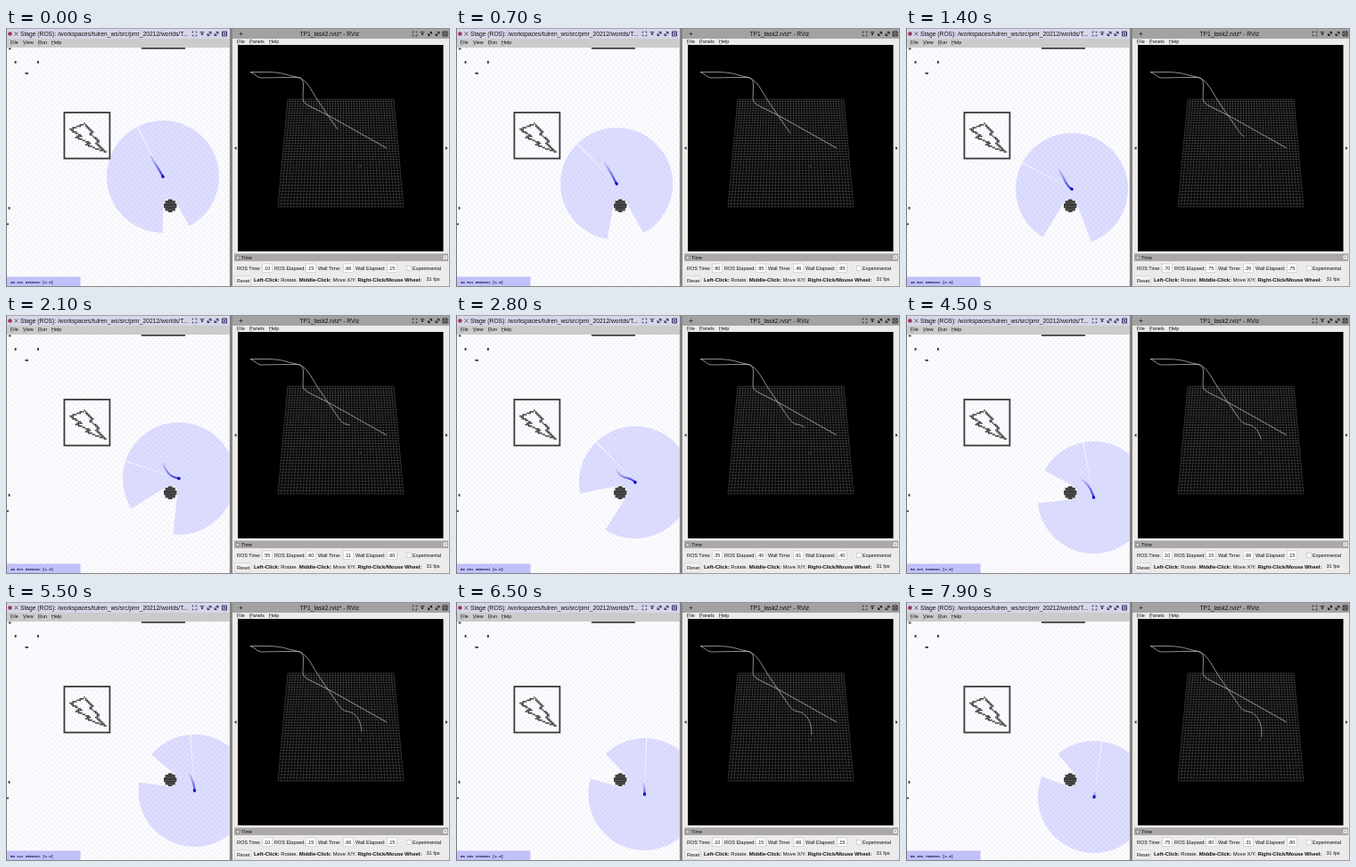
An HTML page for the animation above (8000 ms loop, 498 by 291 pixels).

```html
<!DOCTYPE html>
<html lang="en">
<head>
<meta charset="utf-8">
<title>Robot simulation</title>
<style>
html, body { margin: 0; width: 100%; height: 100%; overflow: hidden; background: #d6d6d6; }
svg { display: block; width: 498px; height: 291px; }
text { font-family: "Liberation Sans", Arial, sans-serif; font-size: 5.5px; fill: #111; white-space: pre; }
.title { font-size: 6.7px; }
.mono { font: bold 4px "Liberation Mono", monospace; fill: #101040; }
.hint { font-size: 5.85px; }
.hint tspan { font-weight: bold; }
</style>
</head>
<body>
<svg viewBox="0 0 498 291">
  <defs>
    <pattern id="weave" width="6" height="6" patternUnits="userSpaceOnUse">
      <path d="M0 0L6 6M6 0L0 6" stroke="#ececf7" stroke-width=".6"/>
    </pattern>
    <clipPath id="world"><rect x="1" y="22" width="249.5" height="268"/></clipPath>
    <clipPath id="view"><rect x="260" y="19" width="230.5" height="232"/></clipPath>
  </defs>

  <g id="stage">
    <rect width="251" height="12" fill="#d6d6e8"/>
    <rect y="12" width="251" height="10" fill="#cbcbcb"/>
    <rect x="1" y="22" width="249.5" height="268" fill="#fcfcff"/>
    <rect x="1" y="22" width="249.5" height="268" fill="url(#weave)"/>
    <g clip-path="url(#world)">
      <path id="scan" fill="#0000ff" fill-opacity=".122"/>
      <g id="trail" stroke="#1c1cd8" stroke-width="2.2"></g>
      <rect id="robot" x="-1.6" y="-1.5" width="3.2" height="3" fill="#0c0cc0"/>
      <g id="map" fill="#3a3a3a"></g>
      <rect x="65.4" y="95" width="51" height="51.6" fill="none" stroke="#3a3a3a" stroke-width="1.8"/>
      <rect x="1" y="279.5" width="82.5" height="10.5" fill="#c0c0fa"/>
      <text id="clock" class="mono" x="5" y="286.6"></text>
    </g>
    <path d="M.5 0V290.5H251" fill="none" stroke="#777" stroke-width="1"/>
  </g>

  <g id="rviz">
    <rect x="251" width="3" height="291" fill="#858585"/>
    <rect x="254" width="244" height="291" fill="#ecebea"/>
    <rect x="254" width="244" height="12" fill="#a2a2a2"/>
    <rect x="260" y="19" width="230.500" height="232"/>
    <path d="M258.5 133l-2.5 2 2.5 2zM493 133l2.5 2-2.5 2z" fill="#333"/>
    <g clip-path="url(#view)" fill="none">
      <path id="grid" stroke="#777" stroke-width=".36"/>
      <path d="M427 135L363 99 341 88Q333 84 333 80L333.500 63Q333 56 327 55.500L312 55.500 286 56Q281 55 279 52L274 49.500 295 49.500Q309 50 317 53L330 56Q337 60 341 67L350 82 372 114" stroke="#c8c8c8" stroke-width=".7"/>
      <path id="track" stroke="#c8c8c8" stroke-width=".7"/>
      <rect x="375.500" y="131.500" width="1.200" height="1" fill="#8a1515"/>
      <rect id="goal" x="396.500" y="154.500" width="1.500" height="1.200"/>
    </g>
    <rect x="256" y="253.500" width="240" height="8.500" fill="#aca8a8"/>
    <circle cx="260" cy="258" r="2" fill="#fff" stroke="#444" stroke-width=".6"/>
    <path d="M260 256.800V258H261" fill="none" stroke="#444" stroke-width=".5"/>
    <rect x="490" y="255" width="5.500" height="5.500" fill="#eee" stroke="#777" stroke-width=".5"/>
    <path d="M491.500 256.500l2.400 2.400m0-2.400l-2.400 2.400" stroke="#777" stroke-width=".5"/>
    <rect x="449.500" y="267.300" width="5" height="5" fill="#fff" stroke="#bbb" stroke-width=".6"/>
    <rect x="256.500" y="278.500" width="18" height="10.500" rx="1" fill="#f1f1f1" stroke="#ccc" stroke-width=".6"/>
  </g>

  <g id="labels">
    <text class="hint" x="278" y="285"><tspan>Left-Click:</tspan> Rotate. <tspan>Middle-Click:</tspan> Move X/Y. <tspan>Right-Click/Mouse Wheel:</tspan></text>
  </g>
  <path d="M0 290.500H498M497.500 0V291M0 .3H498" stroke="#888" stroke-width=".8"/>
</svg>
<script>
const LOOP = 8000, STEP = 100, RANGE = 63, TRAIL = 2200;
const rad = Math.PI / 180;
const $ = id => document.getElementById(id);

function add(parent, tag, attrs, content = "") {
  const el = document.createElementNS("http://www.w3.org/2000/svg", tag);
  for (const key in attrs) el.setAttribute(key, attrs[key]);
  el.textContent = content;
  return parent.appendChild(el);
}
const label = (x, y, content, cls = "") => add($("labels"), "text", { x, y, class: cls }, content);

// time, x, y, heading in degrees, speed in px/s
const poses = [
  [-2200, 162, 143, 63, 13], [0, 176, 167, 63, 12.5], [1400, 186, 181, 28, 12],
  [2100, 194, 183.7, 18, 12], [2800, 201, 188, 46, 12], [3800, 208, 198, 71, 11.5],
  [4500, 210.5, 205, 79, 9], [6500, 211.5, 216, 92, 3.2], [7900, 211, 219, 98, 1.5]
];
// time, simulated seconds in the world view, ROS seconds
const clocks = [
  [0, 289, 289.1], [1400, 294.65, 294.7], [2800, 300.35, 300.35], [3800, 304.1, 304.3],
  [4500, 307, 307.1], [6500, 315.1, 315.1], [7900, 320.75, 320.75]
];

function span(keys, t) {
  let i = 0;
  while (i < keys.length - 2 && t >= keys[i + 1][0]) i++;
  const a = keys[i], b = keys[i + 1];
  return [a, b, (t - a[0]) / (b[0] - a[0])];
}
const mix = (a, b, u) => a + (b - a) * u;

function poseAt(t) {
  const [a, b, u] = span(poses, t), dt = (b[0] - a[0]) / 1000;
  const hermite = (p, q, m, n) =>
    (2 * u ** 3 - 3 * u * u + 1) * p + (3 * u * u - 2 * u ** 3) * q +
    (u ** 3 - 2 * u * u + u) * m * dt + (u ** 3 - u * u) * n * dt;
  const axis = (i, fn) => hermite(a[i], b[i], a[4] * fn(a[3] * rad), b[4] * fn(b[3] * rad));
  return { x: axis(1, Math.cos), y: axis(2, Math.sin), heading: mix(a[3], b[3], u) };
}

const post = { x: 184.2, y: 199.6, r: 8 };

function rayLength(x, y, angle) {
  const dx = post.x - x, dy = post.y - y;
  const along = dx * Math.cos(angle) + dy * Math.sin(angle);
  const off = dx * Math.sin(angle) - dy * Math.cos(angle);
  if (along < 0 || Math.abs(off) > post.r) return RANGE;
  return along - Math.sqrt(post.r ** 2 - off ** 2);
}

function scanPath({ x, y, heading }) {
  let d = `M${x} ${y}`;
  for (let deg = 180.5; deg <= 539.5; deg += 0.5) {
    const a = (heading + deg) * rad, r = rayLength(x, y, a);
    d += `L${(x + r * Math.cos(a)).toFixed(1)} ${(y + r * Math.sin(a)).toFixed(1)}`;
  }
  return d + "Z";
}

function project({ x, y }) {
  const d = y - 167;
  return `${(372 + 0.757 * (x - 176)).toFixed(1)} ${(114 + d * (0.5 + 0.0045 * d)).toFixed(1)}`;
}

function buildMap() {
  const map = $("map"), cell = 1.6, used = new Set();
  const block = (x, y, width, height) => add(map, "rect", { x, y, width, height });
  const plot = (x, y) => {
    const cx = Math.round(x / cell), cy = Math.round(y / cell), key = cx + "," + cy;
    if (used.has(key)) return;
    used.add(key);
    block(cx * cell - cell / 2, cy * cell - cell / 2, cell, cell);
  };
  const bolt = [[72, 114], [88, 107.5], [97, 117], [94.5, 119], [104, 127], [101.5, 129],
    [112, 139.5], [90, 131], [94, 129], [79, 123], [84, 121], [72, 114]];
  for (let i = 1; i < bolt.length; i++) {
    for (let u = 0; u <= 1; u += 0.05) {
      plot(mix(bolt[i - 1][0], bolt[i][0], u), mix(bolt[i - 1][1], bolt[i][1], u));
    }
  }
  for (let row = -4; row <= 4; row++) {
    const half = (Math.floor(Math.sqrt(18 - row * row)) + 0.5) * cell;
    block(post.x - half, post.y + (row - 0.5) * cell, half * 2, cell + 0.2);
  }
  block(152, 22, 49, 1.7);
  block(3, 22.5, 2.5, 1.8);
  for (const [x, y] of [[9.7, 37], [35, 37]]) block(x, y, 1.9, 2.8);
  block(21.5, 50, 3.5, 1.8);
  block(2.7, 201, 1.8, 2.8);
  block(1, 219.5, 2, 1.8);
}

function buildGrid() {
  const cells = 40;
  let d = "";
  for (let i = 0; i <= cells; i++) {
    const u = i / cells, v = u * 119 / ((1 - u) * 141 + u * 119);
    const y = mix(80, 201, v);
    d += `M${mix(316, 305, v)} ${y}H${mix(435, 446, v)}M${mix(316, 435, u)} 80L${mix(305, 446, u)} 201`;
  }
  $("grid").setAttribute("d", d);
}

function windowButtons(xs, stroke) {
  const shapes = ["M-2.3-1V-2.3H-1M1-2.3H2.3V-1M2.3 1V2.3H1M-1 2.3H-2.3V1",
    "M-2.3-1.8H2.3M-1-.3H1L0 1.5Z", "M-2 2L2-2M-.5-2H2V.5M-2-.5V2H.5", "M-2 2L2-2M-.5-2H2V.5M-2-.5V2H.5",
    "M-2.5-2.5H2.5V2.5H-2.5ZM-1.5-1.5L1.5 1.5M1.5-1.5L-1.5 1.5"];
  shapes.forEach((d, i) => add($("labels"), "path", {
    d, transform: `translate(${xs[i]} 6.5)`, fill: "none", stroke, "stroke-width": 0.9
  }));
}

function buildLabels() {
  label(16, 9, "Stage (ROS): /workspaces/tulren_ws/src/pmr_20212/worlds/T...", "title");
  label(329.5, 9, "TP1_task2.rviz* - RViz", "title");
  windowButtons([211.5, 220, 228, 236, 245], "#22225a");
  windowButtons([458.5, 467, 475.5, 484, 492.5], "#1a1a1a");
  add($("labels"), "circle", { cx: 4.5, cy: 6.5, r: 2.3, fill: "#9b3560" });
  add($("labels"), "path", { d: "M9.5 4.5L13.5 8.5M13.5 4.5L9.5 8.5M261.5 6.5H265.5M263.5 4.5V8.5", stroke: "#333", "stroke-width": 0.8 });
  const menu = (y, items) => items.forEach(([x, s]) => {
    label(x, y, s);
    add($("labels"), "path", { d: `M${x} ${y + 0.8}h3`, stroke: "#555", "stroke-width": 0.4 });
  });
  menu(18, [[5, "File"], [19, "View"], [36, "Run"], [51, "Help"]]);
  menu(17, [[259, "File"], [273, "Panels"], [295, "Help"]]);
  label(264, 260.3, "Time");
  label(456, 272, "Experimental");
  label(259, 285.5, "Reset");
  label(471.5, 284.3, "31 fps");
  return [[259, 287.5, "ROS Time:"], [301, 336.5, "ROS Elapsed:"],
    [350, 378.5, "Wall Time:"], [392, 427.5, "Wall Elapsed:"]].map(([x, box, s]) => {
    label(x, 272, s);
    add($("labels"), "rect", { x: box, y: 265, width: 11, height: 9.5, fill: "#fff", stroke: "#c4c4c4", "stroke-width": 0.6 });
    return label(box + 1.2, 272, "");
  });
}

buildMap();
buildGrid();
const fields = buildLabels();
const segments = Array.from({ length: 22 }, (_, i) =>
  add($("trail"), "path", { "stroke-opacity": (0.08 + 0.85 * i / 21).toFixed(2) }));

const pad = (n, size) => String(n).padStart(size, "0");
const hundredths = s => "." + pad(Math.round(s * 100) % 100, 2);
const snap = s => Math.round(s * 20) / 20;

function render(t) {
  const pose = poseAt(t);
  $("scan").setAttribute("d", scanPath(pose));
  $("robot").setAttribute("transform", `translate(${pose.x} ${pose.y}) rotate(${pose.heading})`);

  const dt = TRAIL / segments.length;
  segments.forEach((el, i) => {
    const a = poseAt(t - TRAIL + i * dt), b = poseAt(t - TRAIL + (i + 1) * dt);
    el.setAttribute("d", `M${a.x} ${a.y}L${b.x} ${b.y}`);
  });

  let track = "M372 114";
  for (let s = STEP; s <= t; s += STEP) track += "L" + project(poseAt(s));
  $("track").setAttribute("d", track);
  $("goal").setAttribute("fill", t < 700 ? "#555" : "#08784a");

  const [a, b, u] = span(clocks, t);
  const ms = Math.round(snap(mix(a[1], b[1], u)) * 1000);
  $("clock").textContent = `${Math.floor(ms / 60000)}m ${pad(Math.floor(ms / 1000) % 60, 2)}s ${pad(ms % 1000, 3)}msec [1.0]`;
  const ros = snap(mix(a[2], b[2], u));
  [ros, ros + 0.05, ros + 0.56, ros + 0.05].forEach((v, i) => { fields[i].textContent = hundredths(v); });
}

const start = performance.now();
function tick() {
  const t = (performance.now() - start) % LOOP;
  render(Math.floor(t / STEP) * STEP);
  requestAnimationFrame(tick);
}
tick();
</script>
</body>
</html>
```
